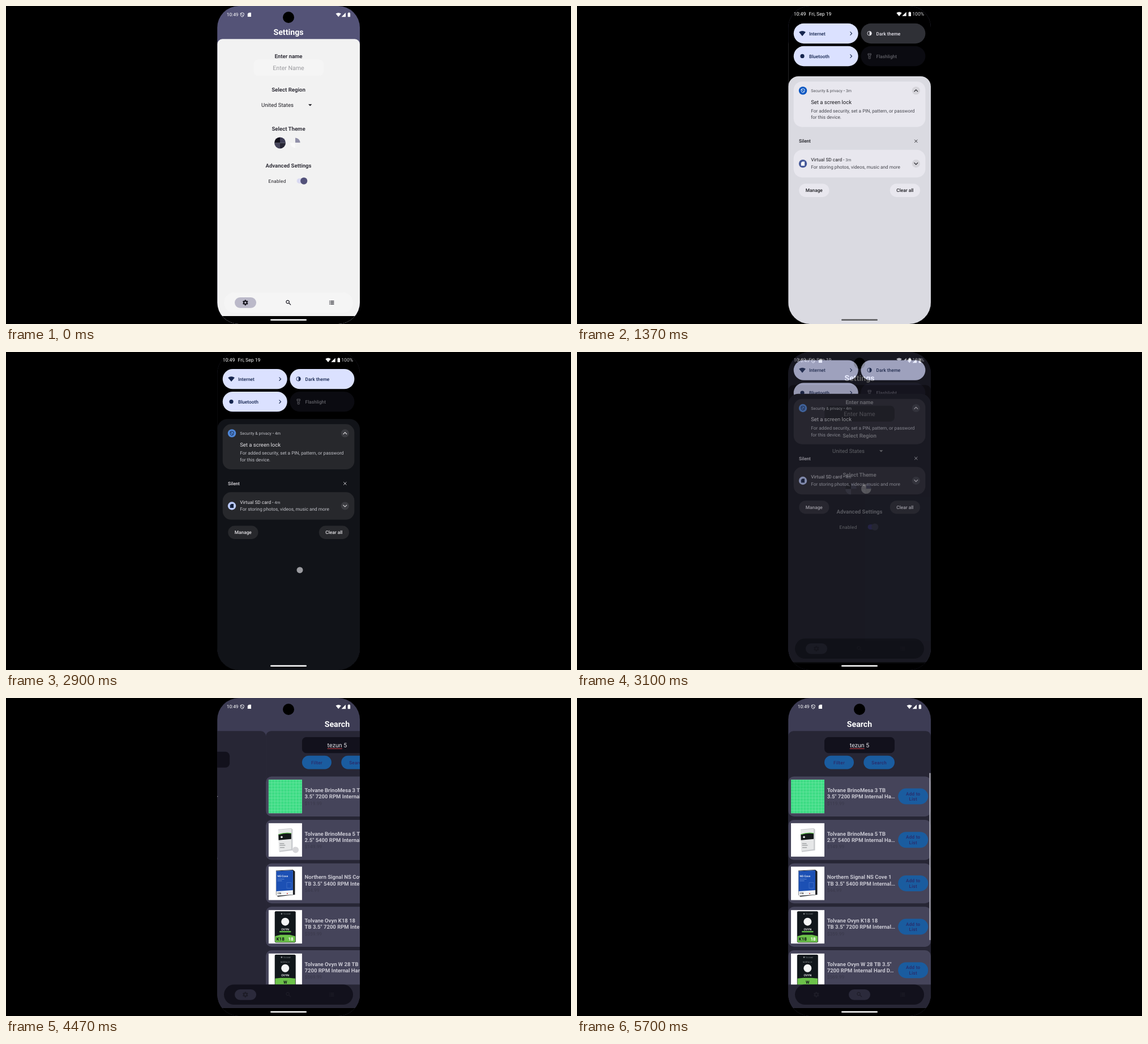
Animation, 998 px wide and 561 px high, one loop 5.73 s. Source, as an HTML page:

```html
<!DOCTYPE html>
<html lang="en">
<head>
<meta charset="utf-8">
<title>Theme switch demo</title>
<style>
html, body { margin: 0; height: 100%; overflow: hidden; background: #000; }
svg { display: block; width: 100%; height: 100%; }
text { font-family: Roboto, sans-serif; white-space: pre; text-rendering: geometricPrecision; }
.m { text-anchor: middle; }
.b { font-weight: 700; }
.d { font-weight: 500; }
.s { letter-spacing: .25px; }
</style>
</head>
<body>
<svg id="stage" viewBox="0 0 998 561"></svg>
<script>
const LOOP = 5730, PAGE = 251.8;
const stage = document.getElementById('stage');

// Drawing helpers; colours starting with "--" are theme variables
const col = c => c.startsWith('--') ? `var(${c})` : c;
const rect = (x, y, w, h, r, c, more = '') =>
  `<rect x="${x}" y="${y}" width="${w}" height="${h}" rx="${r}" style="fill:${col(c)}" ${more}/>`;
const disc = (x, y, r, c, more = '') => `<circle cx="${x}" cy="${y}" r="${r}" style="fill:${col(c)}" ${more}/>`;
const text = (x, y, size, str, c, cls = '') =>
  `<text x="${x}" y="${y}" font-size="${size}" class="${cls}" style="fill:${col(c)}">${str}</text>`;
const shape = (d, c) => `<path d="${d}" style="fill:${col(c)}"/>`;
const line = (d, c, w = 1) => `<path d="${d}" style="fill:none;stroke:${col(c)};stroke-width:${w}"/>`;
const group = (id, body) => `<g id="${id}">${body}</g>`;

// Icons
const wifi = (x, y, s, c) => shape(`M${x} ${y + 3.7 * s}L${x - 4.7 * s} ${y - 2 * s}Q${x} ${y - 5.2 * s} ${x + 4.7 * s} ${y - 2 * s}Z`, c);
const signal = (x, y) => shape(`M${x} ${y}h7.4v-7.4z`, '#fff');
const battery = (x, y) => rect(x, y + .9, 4.4, 7, .7, '#fff') + rect(x + 1.3, y, 1.8, 1.5, 0, '#fff');
const sdCard = (x, y, c) => shape(`M${x - 1} ${y - 3.6}h4v7.2h-6.2v-5.2z`, c);
const shield = (x, y, c) =>
  line(`M${x} ${y - 3.6}l3 1.1v2.5q0 2.6 -3 3.8q-3 -1.2 -3 -3.8v-2.5zM${x - 2.6} ${y - 2.4}l5 5`, c, .9);
const chevron = (x, y, dir, c) => line(`M${x - 3.3} ${y + 1.7 * dir}l3.3 ${-3.3 * dir}l3.3 ${3.3 * dir}`, c, 1.1);
const pie = (x, y, r, colors) => colors.map((c, i) =>
  `<path d="M${x} ${y}v${-r}a${r} ${r} 0 0 1 ${r} ${r}z" fill="${c}" transform="rotate(${i * 90} ${x} ${y})"/>`).join('');
const gear = (x, y) => {
  const teeth = [0, 60, 120, 180, 240, 300].map(a =>
    `<path d="M${x} ${y - 2.6}v-2.3" style="stroke:var(--icon);stroke-width:2.3" transform="rotate(${a} ${x} ${y})"/>`);
  return teeth.join('') + `<circle cx="${x}" cy="${y}" r="2.75" style="fill:none;stroke:var(--icon);stroke-width:2.1"/>`;
};

// Settings page
const label = (y, str) => text(499, y, 9.6, str, '--label', 'm b');
const body = rect(373.2, 58.3, PAGE, 520, 9, '--body');
const settings = body +
  text(499, 50.6, 14.2, 'Settings', '#fff', 'm b') +
  label(91.6, 'Enter name') + rect(437.3, 94.7, 123.7, 28, 7.5, '--box') +
  text(499, 112.9, 10.6, 'Enter Name', '--hint', 'm') +
  label(150.5, 'Select Region') + text(451, 178.2, 9.57, 'United States', '--text') +
  shape('M534 173.3h6.4l-3.2 3.2z', '--text') +
  label(219.9, 'Select Theme') +
  pie(484, 241.4, 10, ['#3d3c54', '#272635', '#45445a', '#12111c']) +
  `<g opacity=".6">${pie(510.8, 241.3, 8.8, ['#53527a', '#f5f5f5', '#fff', '#f2f2f2'])}</g>` +
  label(284.6, 'Advanced Settings') +
  text(463.6, 311.6, 8.2, 'Enabled', '--text', 's') +
  rect(513.6, 304.3, 17, 8.8, 4.4, '--track') + disc(526.2, 308.6, 6.1, '--knob');

// Search page
const button = (x, y, w, h, lines) => rect(x, y, w, h, h / 2, '#1a5c9f') +
  lines.map((s, i) => text(x + w / 2, y + h / 2 + 2.9 + (i - (lines.length - 1) / 2) * 9.6, 8.1, s, '#2b2a68', 'm d s')).join('');

const gridPic = y => {
  let d = '';
  for (let i = 1; i < 11; i++) d += `M${378 + i * 5.4} ${y}v59M378 ${y + i * 5.4}h59`;
  return rect(378, y, 59, 59, 0, '#3ddc84') + line(d, '#7fe9ae', .5);
};
const silverPic = y => shape(`M395 ${y + 11}l23 -2l2.5 2v37l-23.5 3z`, '#c9cbce') +
  shape(`M395 ${y + 12}l23 -2v36l-22 3z`, '#e6e7e8') +
  shape(`M395.3 ${y + 20}q12 -4 22.7 -2v10l-22.4 2z`, '#15191a') +
  line(`M395.3 ${y + 20}q12 -4 22.7 -2`, '#58b947', 1.2) +
  disc(401, y + 24.5, 1.8, '#e8e8e8') +
  line(`M397.500 ${y + 36}h8M397.500 ${y + 39}h10M398 ${y + 43}h8`, '#77797c', .9);
const bluePic = y => shape(`M391 ${y + 7}l30 -1.500l3.500 3v41l-30 3.500l-3.500 -3z`, '#1c1e22') +
  shape(`M391.500 ${y + 8}l29.5 -1.500v43l-29.5 2z`, '#f2f4f6') +
  shape(`M391.500 ${y + 8}l29.5 -1.500v35l-29.5 2z`, '#1c50b4') +
  text(393.5, y + 18.5, 4.9, 'NS Cove', '#fff', 'd') +
  line(`M393.500 ${y + 22}h12M393.500 ${y + 25}h8`, '#8fb0e6', .6) +
  line(`M410 ${y + 28}h8v10h-8z`, '#5b86d4', .5) +
  text(393.2, y + 48.8, 3.8, '1TB', '#222', 'b') + disc(411, y + 47.5, 1, '#c33');
const darkPic = (y, left, right, tag) => rect(388.8, y + 2, 37, 55.3, 2, '#11171b') +
  disc(401, y + 6.6, 1.3, '#8b9194') + text(403.5, y + 7.8, 3.2, 'TOLVANE', '#8b9194') +
  (tag ? text(407.3, y + 16.5, 3.2, tag, '#9ca2a5', 'm') : '') +
  disc(407.3, y + (tag ? 26 : 20.5), 7, '#f4f6f6') +
  text(407.3, y + (tag ? 40.5 : 35.4), 5.2, 'OVYN', '#fff', 'm d') +
  (tag ? '' : rect(397, y + 36.8, 20.6, 2.6, 1, '#5fb946')) +
  shape(`M389.500 ${y + 46}${tag ? 'v-2l10 -1h15l10.500 1' : 'l9 -2.500h17l9.500 2.500'}v${tag ? 13 : 10.5}h-35.6z`, '#6cc24a') +
  (tag ? text(407.3, y + 53, 7.5, left, '#10151a', 'm b')
       : text(391.6, y + 53.6, 8, left, '#10151a', 'b') + text(412.5, y + 53.6, 8, right, '#fff', 'b'));

const items = [
  ['Tolvane BrinoMesa 3 TB', '3.5" 7200 RPM Internal Ha…', '$119.99', gridPic],
  ['Tolvane BrinoMesa 5 TB', '2.5" 5400 RPM Internal Ha…', '$149.99', silverPic],
  ['Northern Signal NS Cove 1', 'TB 3.5" 5400 RPM Internal…', '$44.99', bluePic],
  ['Tolvane Ovyn K18 18', 'TB 3.5" 7200 RPM Internal…', '$359.99', y => darkPic(y, 'K18', '18')],
  ['Tolvane Ovyn W 28 TB 3.5"', '7200 RPM Internal Hard D…', '$569.99', y => darkPic(y, 'W', '', 'NOZEVA 2+')]
];
const rows = items.map(([a, b, price, pic], i) => {
  const y = 138.4 + i * 76.65;
  return rect(373.2, y, PAGE, 70.6, 10, '#45445a') + rect(378, y + 5.8, 59, 59, 0, '#fff') + pic(y + 5.8) +
    text(441.7, y + 27.7, 9.5, a, '#cac9d3', 'b') + text(441.7, y + 39, 9.5, b, '#cac9d3', 'b') +
    text(441.7, y + 50.3, 8.4, price, '#3b3a4c') +
    button(567.2, y + 21.2, 53, 28, ['Add to', 'List']);
}).join('');
const search = body +
  text(499, 50.6, 14.2, 'Search', '#fff', 'm b') +
  rect(437, 69, 124, 28.2, 7.5, '--box') + text(499, 87.2, 10.6, 'tezun 5', '#e8e7ec', 'm') +
  line('M481.800 89.300h26', '#d9474a', 1) +
  button(437, 101.8, 52, 23.6, ['Filter']) + button(506.3, 101.8, 54.7, 23.6, ['Search']) +
  rows + rect(373.2, 505.5, PAGE, 60, 0, '--body') + rect(622.3, 132.3, 2.3, 295, 1, '#a6a5af');

const app = rect(373, 0, 253, 561, 0, '--head') +
  group('pages', settings + `<g transform="translate(${PAGE} 0)">${search}</g>`) +
  text(389.8, 18.4, 8.3, '10:49', '#fff') + shield(417.2, 15.4, '#fff') + sdCard(430, 15.3, '#fff') +
  wifi(587.2, 15.6, 1, '#fff') + signal(592.6, 19.2) + battery(603.7, 11.4) +
  disc(499, 20, 10, '#000') +
  rect(385, 505.5, 228, 35.6, 17.8, '--box') +
  rect(404, 514, 38, 18.7, 9.35, '--ind', 'id="tabA"') + rect(480, 514, 38, 18.7, 9.35, '--ind', 'id="tabB"') +
  gear(422.8, 523.3) +
  line('M500.300 522a2.700 2.700 0 1 0 -5.400 0a2.700 2.700 0 1 0 5.400 0M499.700 524l3.400 3.400', '--icon', 1.2) +
  line('M571 520.700h1.300M573.200 520.700h6.200M571 523.300h1.300M573.200 523.300h6.200M571 525.900h1.300M573.200 525.900h6.200', '--icon', 1.2) +
  rect(373, 547, 253, 14, 0, '#000');

// Notification shade
const tile = (x, y, name, bg, fg, icon, arrow) => rect(x, y, 114, 35.4, 17.7, bg) + icon +
  text(x + 27.2, y + 20.8, 8.3, name, fg, 'd') +
  (arrow ? line(`M${x + 99.8} ${y + 14.6}l3 3.100l-3 3.100`, fg, 1.1) : '');
const NAVY = '#16264f', SKY = '#dbe1ff';
const tiles =
  tile(382.7, 30.8, 'Internet', SKY, NAVY, wifi(398, 48.6, 1.25, NAVY), true) +
  tile(501.4, 30.8, 'Dark theme', '--tile', '--tileText',
    line('M520.300 48.300a3.700 3.700 0 1 0 -7.400 0a3.700 3.700 0 1 0 7.400 0', '--tileText', .9) +
    shape('M516.600 44.600a3.700 3.700 0 0 1 0 7.400z', '--tileText')) +
  tile(382.7, 70.8, 'Bluetooth', SKY, NAVY, disc(398, 88.4, 3.6, NAVY), true) +
  tile(501.4, 70.8, 'Flashlight', '#0b0b11', '#606067',
    line('M514 84h5.400v2.400l-1.200 1.500v5h-3v-5l-1.200 -1.500zM514 86.100h5.400M516.700 88.500v2', '#606067', .9));

const expander = (y, dir) => disc(598.8, y, 7.1, '--chip') + chevron(598.8, y, dir, '--chipMark');
const pill = (x, name) => rect(x, 313.4, 53.2, 23.5, 11.75, '--card') + text(x + 26.6, 328.1, 8.3, name, '--silent', 'm d');
const age = () => '<tspan class="age"></tspan>';
const sheet =
  shape('M373.200 142a18 18 0 0 1 18 -18h215.800a18 18 0 0 1 18 18v460h-251.800z', '--sheet') +
  rect(382.7, 133.2, 232.7, 80.2, 15, '--card') +
  disc(399, 149.4, 7.2, '--lock') + shield(399, 149.4, '--glyph') +
  text(413.2, 152.1, 7.1, 'Security &amp; privacy • ' + age(), '--meta') + expander(149.4, 1) +
  text(413.2, 172.7, 9.5, 'Set a screen lock', '--title') +
  text(413.2, 187.6, 8.25, 'For added security, set a PIN, pattern, or password', '--desc') +
  text(413.2, 199.5, 8.25, 'for this device.', '--desc') +
  text(392, 241.5, 8.2, 'Silent', '--silent', 'd') +
  line('M596.200 235.800l5.200 5.200M601.400 235.800l-5.200 5.200', '--silent', .9) +
  rect(382.7, 253.8, 232.7, 48.7, 15, '--card') +
  disc(399, 278.1, 7.2, '--disk') + sdCard(399, 278.1, '--glyph') +
  text(413.2, 274.4, 8.3, 'Virtual SD card', '--title') +
  text(470, 274.4, 7.1, '• ' + age(), '--meta') + expander(278.1, -1) +
  text(413.2, 286.8, 8.25, 'For storing photos, videos, music and more', '--desc') +
  pill(392.2, 'Manage') + pill(552.8, 'Clear all');

const shade = rect(373, 0, 253, 561, 0, '#000') +
  text(382.6, 17, 8.8, '10:49', '#fff') + text(409.6, 17, 8.6, 'Fri, Sep 19', '#fff') +
  wifi(569, 14.2, 1, '#fff') + signal(574.3, 17.8) + battery(585.6, 10.2) + text(592.2, 17, 8.7, '100%', '#c9c9cc') +
  group('tiles', tiles) + group('sheet', sheet);

stage.innerHTML = '<clipPath id="phone"><rect x="373.2" width="251.8" height="561" rx="38"/></clipPath>' +
  `<g clip-path="url(#phone)">${app}${group('shade', shade)}</g>` +
  rect(467, 552.5, 64, 2.6, 1.3, '--home') + disc(0, 0, 5.5, 'rgba(200,200,204,.75)', 'id="touch"');

// Light and dark colours
const appColors = {
  head: ['#545377', '#3d3c54'], body: ['#f2f2f2', '#272635'], box: ['#f5f5f5', '#12111c'],
  label: ['#36353e', '#c9c8d2'], hint: ['#9b9b9f', '#8e8d96'], text: ['#1d1c22', '#e1e0e6'],
  ind: ['#bbb9c9', '#2b2a3b'], icon: ['#17161f', '#1d1c27'], track: ['#dadaf2', '#463f8f'], knob: ['#53527a', '#45445a']
};
const cardColors = { card: ['#e8e7ee', '#27282c'], silent: ['#1b1b20', '#e4e2e6'] };
const noteColors = {
  title: ['#1b1b20', '#e4e2e6'], desc: ['#46474f', '#c0c1c7'], meta: ['#55565d', '#c0c1c7'],
  chip: ['#d5d4da', '#3b3c41'], chipMark: ['#1b1b20', '#e4e2e6'],
  lock: ['#0b57c2', '#4f87d8'], disk: ['#475a9a', '#b9c8f6'], glyph: ['#ffffff', '#14213f']
};
const fadeColors = { sheet: ['#dadae1', '#111318'], tile: ['#2f3036', SKY] };

const mix = (a, b, k) => 'rgb(' + [1, 3, 5].map(i => {
  const p = parseInt(a.substr(i, 2), 16), q = parseInt(b.substr(i, 2), 16);
  return Math.round(p + (q - p) * k);
}) + ')';
const paint = (set, k) => {
  for (const n in set) stage.style.setProperty('--' + n, mix(...set[n], k));
};
const clamp = v => Math.max(0, Math.min(1, v));
const ramp = (t, a, b) => clamp((t - a) / (b - a));

// Linear interpolation through [time, value] points
function track(t, pts) {
  if (t <= pts[0][0]) return pts[0][1];
  for (let i = 1; i < pts.length; i++) {
    const [a, u] = pts[i - 1], [b, v] = pts[i];
    if (t < b) return u + (v - u) * (t - a) / (b - a);
  }
  return pts[pts.length - 1][1];
}

const sheetShift = [[570, -100], [700, -82], [1000, -18], [1130, 2], [1370, 0], [1730, -3.4], [2730, -3.4],
  [2900, -5.7], [3000, -20], [3200, -80], [3470, -110]];
const shadeAlpha = [[570, 0], [700, .18], [1000, .85], [1130, 1], [2930, 1], [3100, .62], [3300, .12], [3470, 0]];
const pageShift = [[4100, 0], [4200, 22], [4300, 70], [4470, 165.5], [4600, 217], [4700, 237], [4850, 249], [5000, PAGE]];
// Each touch: start, end, then from and to positions
const touches = [
  [590, 1100, 519, 20, 519, 420], [1870, 1970, 562, 57, 562, 57],
  [2750, 3050, 519, 434, 519, 336], [4130, 4520, 592, 274, 500, 267]
];

const $ = id => document.getElementById(id);
const ages = document.querySelectorAll('.age');

function render(t) {
  const k = ramp(t, 2130, 2640), dark = t >= 2500 ? 1 : 0;
  paint(appColors, t >= 2400 ? 1 : 0);
  paint(cardColors, ramp(t, 2200, 2330));
  paint(noteColors, ramp(t, 2440, 2580));
  paint(fadeColors, k);
  paint({ tileText: ['#e4e2ea', NAVY] }, k * k);
  stage.style.setProperty('--home', t >= 900 && !dark ? 'rgba(0,0,0,.6)' : '#fff');
  ages.forEach(e => e.textContent = t < 1870 ? '3m' : '4m');

  const y = track(t, sheetShift), lift = Math.min(0, y + 3.4);
  $('shade').style.opacity = track(t, shadeAlpha);
  $('tiles').setAttribute('transform', `translate(0 ${lift * .35})`);
  $('sheet').setAttribute('transform', `translate(0 ${124 + y}) scale(1 ${t > 2730 ? 1 - .005 * ramp(t, 2730, 2900) : 1}) translate(0 -124)`);

  $('pages').setAttribute('transform', `translate(${-track(t, pageShift)} 0)`);
  const tab = ramp(t, 4700, 4900), grow = 1 - (1 - tab) ** 3;
  $('tabA').style.opacity = 1 - tab;
  $('tabB').style.opacity = tab;
  $('tabB').setAttribute('x', 499 - 19 * grow);
  $('tabB').setAttribute('width', 38 * grow);

  const hit = touches.find(([a, b]) => t >= a && t < b);
  $('touch').style.display = hit ? '' : 'none';
  if (hit) {
    const [a, b, x0, y0, x1, y1] = hit, p = (t - a) / (b - a);
    $('touch').setAttribute('cx', x0 + (x1 - x0) * p);
    $('touch').setAttribute('cy', y0 + (y1 - y0) * p);
  }
}

(function frame() {
  render(performance.now() % LOOP);
  requestAnimationFrame(frame);
})();
</script>
</body>
</html>
```
